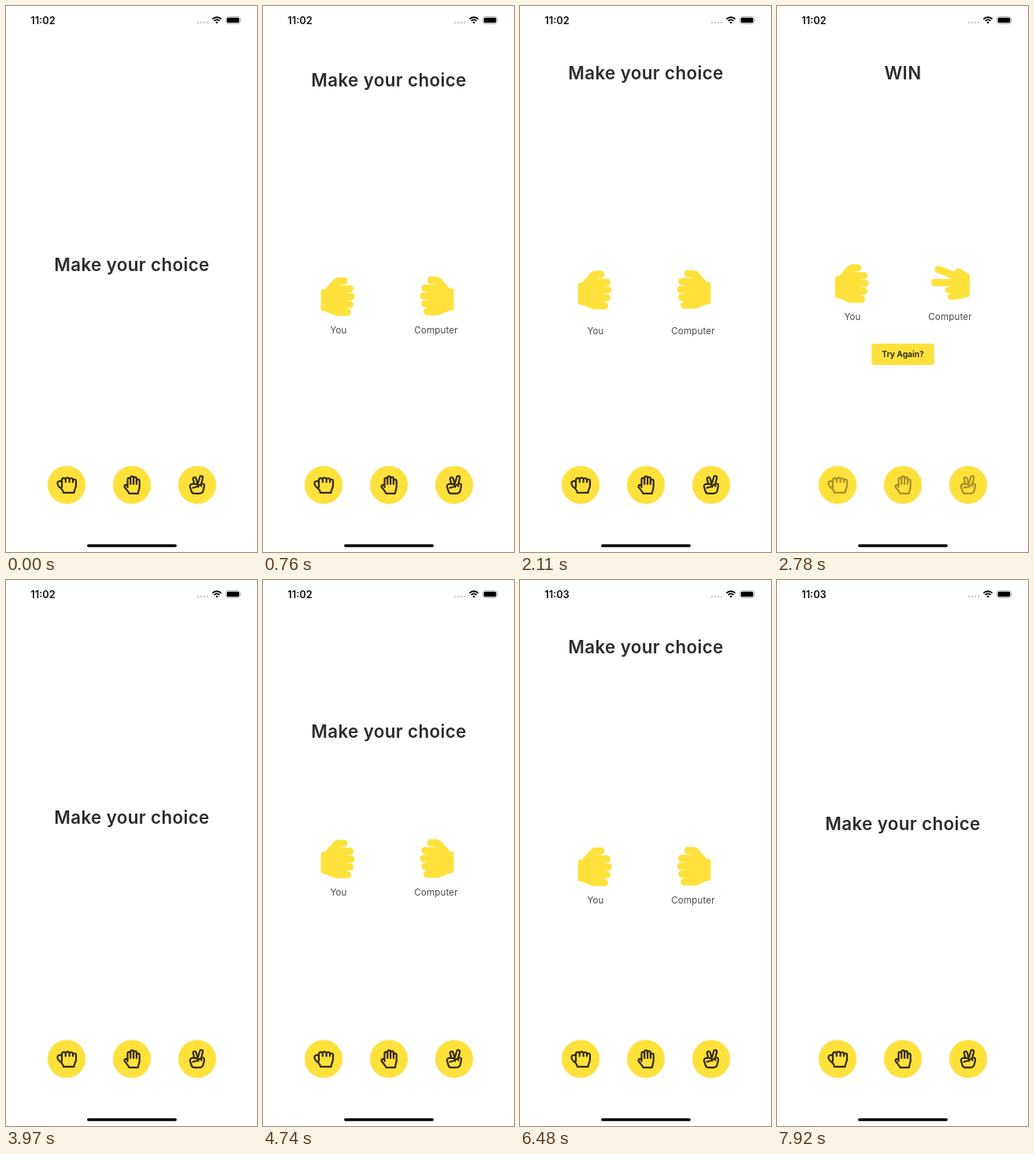
Recreate the animation shown at these times as an HTML page. Size 319 by 692 pixels, loop 8000 ms.

```html
<!DOCTYPE html>
<html lang="en">
<head>
<meta charset="utf-8">
<title>Hand game</title>
<style>
  html, body { margin: 0; width: 100%; height: 100%; overflow: hidden; background: #fff; }
  svg { display: block; width: 100%; height: 100%; }
  text { font-family: Inter, Roboto, sans-serif; text-anchor: middle; }
  .yellow { fill: #ffe13c; }
  #title { font-size: 22.3px; font-weight: 600; letter-spacing: .4px; fill: #2c2c2c; }
  #clock { font-size: 12.8px; font-weight: 600; fill: #111; }
  .label { font-size: 11.5px; letter-spacing: .2px; fill: #4a4a48; }
  #again text { font-size: 10.2px; font-weight: 700; fill: #333016; }
  .icon { fill: none; stroke: #33290f; stroke-width: 2.2; stroke-linecap: round; stroke-linejoin: round; }
</style>
</head>
<body>
<svg viewBox="0 0 319 692">
  <defs>
    <path id="rock" d="M464.8 80c-26.9-.4-48.8 21.2-48.8 48h-8V96.8c0-26.3-20.9-48.3-47.2-48.8-26.9-.4-48.8 21.2-48.8 48v32h-8V80.8c0-26.3-20.9-48.3-47.2-48.8-26.9-.4-48.8 21.2-48.8 48v48h-8V96.8c0-26.3-20.9-48.3-47.2-48.8-26.9-.4-48.8 21.2-48.8 48v136l-8-7.1v-48.1c0-26.3-20.9-48.3-47.2-48.8C21.9 127.6 0 149.2 0 176v66.4c0 27.4 11.7 53.5 32.2 71.8l111.7 99.3c10.2 9.1 16.1 22.2 16.1 35.9v6.7c0 13.3 10.7 24 24 24h240c13.3 0 24-10.7 24-24v-2.9c0-12.8 2.6-25.5 7.5-37.3l49-116.3c5-11.8 7.5-24.5 7.5-37.3V128.8c0-26.3-20.9-48.4-47.2-48.8z"/>
    <path id="scissors" d="M216 440c0-22 18-40 40-40v-8h-32c-22 0-40-18-40-40s18-40 40-40h32v-8H48c-26.5 0-48-21.5-48-48s21.5-48 48-48h208v-13.6L78.4 124.7c-24.6-9.7-36.8-37.6-27.1-62.2 9.7-24.7 37.6-36.8 62.2-27.1l190.4 74.8 24.9-31.1c12.3-15.4 34-19.5 51-9.7l112 64A40 40 0 0 1 512 168v240c0 18.6-12.8 34.7-30.8 38.9l-136 32A40 40 0 0 1 336 480h-80c-22 0-40-18-40-40z"/>
  </defs>

  <text id="clock" x="47" y="22.6"></text>
  <g fill="#c9c9c9">
    <circle cx="244" cy="21" r="1.2"/><circle cx="248" cy="21" r="1.2"/>
    <circle cx="252" cy="21" r="1.2"/><circle cx="256" cy="21" r="1.2"/>
  </g>
  <g fill="none" stroke="#000" stroke-width="1.9">
    <path d="M262.4 16.6a8 8 0 0 1 11.2 0M264.6 18.9a4.9 4.9 0 0 1 6.8 0"/>
    <path d="M268 22.6l-1.7-1.9a2.4 2.4 0 0 1 3.4 0z" fill="#000" stroke="none"/>
  </g>
  <rect x="279.5" y="13.5" width="18" height="9" rx="2.6" fill="none" stroke="#a9a9a9" stroke-width=".8"/>
  <rect x="280.7" y="14.7" width="15.6" height="6.6" rx="1.5"/>
  <path d="M298.5 16.4q1.4 1.6 0 3.2z" fill="#a9a9a9"/>

  <text id="title" x="160" y="336"></text>

  <g id="hands">
    <g id="fists" class="yellow">
      <use href="#rock" transform="translate(119.6 345.2) rotate(90) scale(.0957)"/>
      <use id="cpuRock" href="#rock" transform="translate(196.5 344.4) scale(-1 1) rotate(90) scale(.0957)"/>
      <use id="cpuScissors" href="#scissors" transform="translate(196 344.2) scale(.0957)"/>
    </g>
    <text class="label" x="96" y="416.4">You</text>
    <text class="label" x="220" y="416.4">Computer</text>
  </g>

  <g id="again">
    <rect class="yellow" x="120.3" y="428" width="79.4" height="27" rx="3"/>
    <text x="160" y="445.2">Try Again?</text>
  </g>

  <g class="yellow" stroke="#f6e38a" stroke-width=".6">
    <circle cx="77" cy="607" r="24"/>
    <circle cx="160" cy="607" r="24"/>
    <circle cx="243" cy="607" r="24"/>
  </g>
  <g id="icons">
    <path class="icon" transform="translate(77 607)" d="M-6 2.8V-6.3a2.4 2.4 0 0 1 4.8 0V-3.5M-1.2-6.8a2.4 2.4 0 0 1 4.8 0v3.3M3.6-6.3a2.2 2.2 0 0 1 4.4 0v2.8M8-5a2 2 0 0 1 4 0V.5c0 3-2.2 5-2.5 9.3H-4.2c0-3-1.5-4-3.5-6L-10 1.8c-1.2-1.2-1.6-2.3-1.6-4C-11.6-4.6-8-6-6-3.8"/>
    <path class="icon" transform="translate(160 607)" d="M-5.5 3V-7a1.9 1.9 0 0 1 3.8 0V-1M-1.7-7V-9a1.9 1.9 0 0 1 3.8 0V-1M2.1-8a1.9 1.9 0 0 1 3.8 0V-1M5.9-5a1.9 1.9 0 0 1 3.8 0V2c0 3-1.6 5-1.8 8.8H-3.5c-1-2.5-4-5.5-5.7-8C-10.5.8-7.5-1.5-5.5 1.5"/>
    <path class="icon" transform="translate(243 607)" d="M-3.6-1-5.2-7.2a2 2 0 0 1 3.8-1.2L.4-2.2M1-2 3.2-9.8a2 2 0 0 1 3.9 1L5.2-1.5M-3.6-1c-3-1-6 .5-5.6 3l1.8 5.8c.5 1.7 1.5 3 3.5 3H3c2.5 0 4-1 4.6-3.5L9 1.5c.5-3-2.5-4-4-2.5M-5.5 3.6-1 2.5c2-.6 2-3 .2-3.6L-3.6-1M1.2 2.6c.2-3 3.5-4 4.3-1"/>
  </g>
  <rect x="103" y="682.3" width="114" height="3.5" rx="1.75"/>
</svg>
<script>
const LOOP = 8000, LAST_STEP = 7920, NEW_MINUTE = 5100;
const RISE = 243, HAND_RISE = 36, LIFT = 18, SHAKE = 14, SHAKES = 3;
const rounds = [
  { enter: 440, shake: 1610, rest: 2260, result: 2370, back: 3650 },
  { enter: 4740, shake: 5640, rest: 6310, result: 6375, back: 7560 }
];

const el = id => document.getElementById(id);
const [clock, title, hands, fists, cpuRock, cpuScissors, again, icons] =
  ["clock", "title", "hands", "fists", "cpuRock", "cpuScissors", "again", "icons"].map(el);

const ramp = (t, from, length) => Math.min(1, Math.max(0, (t - from) / length));
const smooth = x => x * x * (3 - 2 * x);
// Distance left to go on a critically damped spring
const left = ms => (1 + ms * .0117) * Math.exp(-ms * .0117);
const moveY = (node, y) => node.setAttribute("transform", `translate(0 ${y.toFixed(2)})`);
const show = (node, on) => node.setAttribute("opacity", +on);
const write = (node, text) => { if (node.textContent !== text) node.textContent = text; };

function pose(t) {
  const idle = { up: 0, handY: 0, shake: 0, hands: 0, again: 0, dim: 0, done: false, win: false };
  const r = rounds.filter(r => t >= r.enter).pop();
  if (!r) return idle;

  // The entry begins abruptly, already partway along its spring
  const entry = left(Math.max(0, t - r.enter - 50) + 160);
  const away = t >= r.back;
  const fade = 1 - ramp(t, r.back, 200);
  const reveal = r.result + 135;
  const beat = ramp(t, r.shake, r.rest - r.shake);
  return {
    up: away ? left(t - r.back) : 1 - entry,
    handY: -HAND_RISE * entry - LIFT * smooth(ramp(t, r.result, 270)),
    shake: -SHAKE * Math.sin(Math.PI * SHAKES * beat) ** 2,
    hands: fade,
    again: ramp(t, reveal, 150) * fade,
    dim: ramp(t, reveal, 100) * fade,
    done: t >= reveal,
    win: t >= reveal && !away
  };
}

function draw(t) {
  const p = pose(Math.min(t, LAST_STEP));
  write(clock, t < NEW_MINUTE ? "11:02" : "11:03");
  write(title, p.win ? "WIN" : "Make your choice");
  moveY(title, -RISE * p.up);
  moveY(hands, p.handY);
  moveY(fists, p.shake);
  show(hands, p.hands);
  show(cpuRock, !p.done);
  show(cpuScissors, p.done);
  show(again, p.again);
  show(icons, 1 - .57 * p.dim);
}

const start = performance.now();
function tick() {
  draw((performance.now() - start) % LOOP);
  requestAnimationFrame(tick);
}
tick();
</script>
</body>
</html>
```
